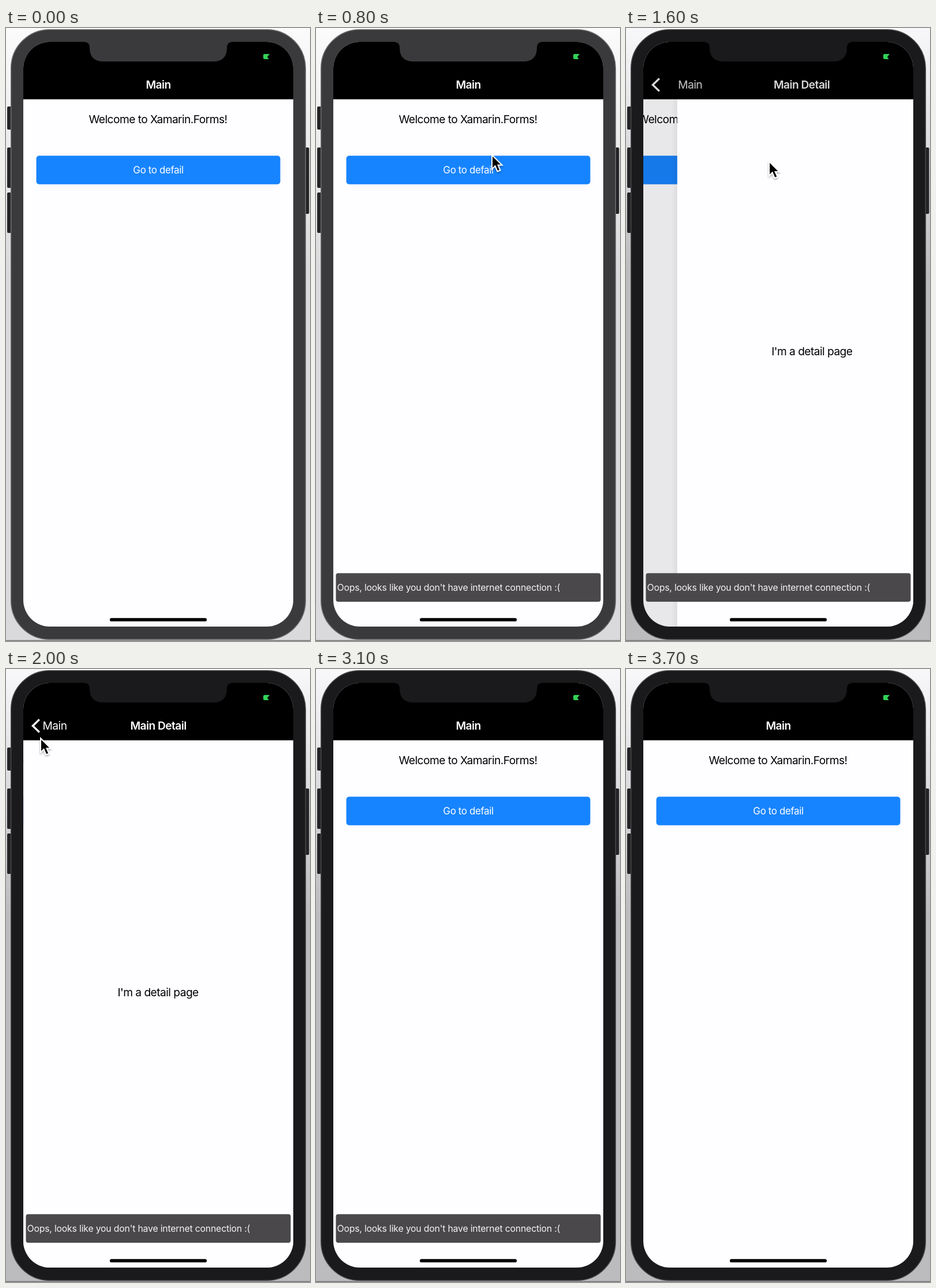
Recreate the animation shown at these times as an HTML page. Size 527 by 1062 pixels, loop 3.8 s.

```html
<!DOCTYPE html>
<html lang="en">
<head>
<meta charset="utf-8">
<title>Offline notice</title>
<style>
  html, body { margin: 0; width: 100%; height: 100%; overflow: hidden; background: #fff; }
  svg {
    display: block; width: 527px; height: 1062px;
    --case: #3a393b; --rim: #6e7072; --shade-top: #fbfbfc; --shade: #dadadc;
  }
  svg.active { --case: #1a191b; --rim: #47494b; --shade-top: #f8f8fa; --shade: #bcbcbe; }
  .case { fill: var(--case); }
  .rim { stroke: var(--rim); stroke-width: 1.5; }
  .key { fill: #242426; }
  text { font-family: Inter, "Open Sans", sans-serif; font-size: 19.2px; letter-spacing: -.029em; fill: #000; }
  .mid { text-anchor: middle; }
  .nav text { fill: #fff; }
  .title { font-weight: 600; }
  text.small { font-size: 17px; letter-spacing: -.024em; fill: #fff; }
  text.note { font-size: 15.8px; letter-spacing: -.012em; fill: #f4f3f4; }
</style>
</head>
<body>
<svg id="stage" viewBox="0 0 527 1062">
  <defs>
    <linearGradient id="backdrop" x2="0" y2="1">
      <stop offset="0" style="stop-color: var(--shade-top)"/>
      <stop offset=".4" style="stop-color: var(--shade)"/>
      <stop offset="1" style="stop-color: var(--shade)"/>
    </linearGradient>
    <linearGradient id="edge">
      <stop offset="0" stop-color="#000" stop-opacity="0"/>
      <stop offset="1" stop-color="#000" stop-opacity=".05"/>
    </linearGradient>
    <clipPath id="screen"><rect x="30" y="24" width="468" height="1013" rx="46"/></clipPath>
    <filter id="soft" x="-50%" y="-50%" width="200%" height="200%">
      <feDropShadow dx="0" dy="2" stdDeviation="1.5" flood-opacity=".35"/>
    </filter>
  </defs>

  <rect width="527" height="1062" fill="url(#backdrop)"/>
  <rect y="1060.5" width="527" height="1.5" fill="#777779"/>

  <g class="key">
    <rect x="2" y="136" width="10" height="40" rx="2"/>
    <rect x="2" y="207" width="10" height="70" rx="2"/>
    <rect x="2" y="285" width="10" height="70" rx="2"/>
    <rect x="515" y="207" width="10.5" height="115" rx="2"/>
  </g>
  <rect class="case rim" x="8.7" y="2.7" width="510.6" height="1056.6" rx="67"/>

  <g clip-path="url(#screen)">
    <rect x="30" y="24" width="468" height="1013" fill="#fefdff"/>
    <g id="mainPage">
      <text class="mid" x="263.5" y="165">Welcome to Xamarin.Forms!</text>
      <rect x="52.5" y="221.2" width="423" height="49.5" rx="5" fill="#1784ff"/>
      <text id="buttonText" class="small mid" x="264" y="252">Go to defail</text>
    </g>
    <rect id="dim" x="30" y="123.5" width="468" height="914"/>
    <g id="detailPage">
      <rect x="20" y="123.5" width="10" height="914" fill="url(#edge)"/>
      <rect x="30" y="123.5" width="468" height="914" fill="#fefdff"/>
      <text class="mid" x="263.5" y="567">I'm a detail page</text>
    </g>

    <g class="nav">
      <rect x="30" y="24" width="468" height="99.5"/>
      <text id="mainTitle" class="title mid" x="264" y="105">Main</text>
      <text id="detailTitle" class="title mid" x="264" y="105">Main Detail</text>
      <polyline id="chevron" points="57.8,87.5 46.4,98.5 57.8,109.5" fill="none" stroke="#fff" stroke-width="3.3"/>
      <text id="backText" x="63.5" y="105">Main</text>
    </g>
    <path class="case" d="M135 23V24Q145 24 145 34Q145 58 169 58H359Q383 58 383 34Q383 24 393 24V23Z"/>
    <path fill="#33d158" d="M446 47.5Q446 45 448.5 45H457L453 50L455.5 54H448.5Q446 54 446 51.5Z"/>

    <g id="snackbar">
      <rect x="34.5" y="944.5" width="459" height="49.5" rx="4" fill="#4a484b"/>
      <text class="note" x="36.5" y="975">Oops, looks like you don't have internet connection :(</text>
    </g>
    <rect x="180" y="1022.3" width="168" height="5.7" rx="2.8"/>
  </g>

  <g id="cursor">
    <path filter="url(#soft)" stroke="#fff" stroke-width="2" d="M1 2V26.5L6.5 21L10.5 30.5L15.5 28.5L11.5 19.5H18.5Z"/>
  </g>
</svg>
<script>
  const LOOP = 3800, TICK = 100;
  const PUSH = 1400, POP = 2336;
  const el = {};
  document.querySelectorAll('[id]').forEach(node => el[node.id] = node);

  const clamp = v => Math.min(1, Math.max(0, v));
  const lerp = (a, b, k) => a + (b - a) * k;
  const smooth = k => k * k * (3 - 2 * k);
  const ramp = (t, from, to) => clamp((t - from) / (to - from));

  // Critically damped spring, 0 to 1
  function spring(ms) {
    const x = Math.max(0, ms) * 0.018;
    return 1 - (1 + x) * Math.exp(-x);
  }

  // [time, x, y] of the pointer tip
  const path = [[700, 316, 204], [800, 304, 218], [1300, 282, 250], [1500, 282, 250], [1900, 59, 118], [2700, 59, 118]];

  function pointer(t) {
    const i = path.findIndex(p => p[0] > t);
    if (i < 1) return null;
    const [a, b] = [path[i - 1], path[i]];
    const k = smooth(ramp(t, a[0], b[0]));
    return [lerp(a[1], b[1], k), lerp(a[2], b[2], k)];
  }

  function place(node, x, y, opacity = 1) {
    node.setAttribute('transform', `translate(${x.toFixed(2)} ${y.toFixed(2)})`);
    node.setAttribute('opacity', opacity.toFixed(3));
  }

  function draw(t) {
    const popping = t >= 2300;
    const s = spring(t - (popping ? POP : PUSH));
    const depth = popping ? 1 - s : s;
    const lagged = s ** 1.2;
    const nav = popping ? 1 - lagged : lagged;

    el.stage.classList.toggle('active', t >= 1300);
    place(el.mainPage, -140 * depth, 0);
    el.dim.setAttribute('opacity', (0.1 * depth).toFixed(3));
    place(el.detailPage, 468 * (1 - depth), 0, depth > 0.001 ? 1 : 0);

    place(el.mainTitle, -179 * nav, 0, 1 - nav);
    place(el.detailTitle, 273 * (1 - nav), 0, nav);
    place(el.backText, 179 * (1 - nav), 0, clamp(2 * nav - 1) * (popping ? 0.3 : 1));
    el.chevron.setAttribute('opacity', popping ? Math.min(nav, 0.2) : nav);

    const pressed = t >= 1400 && t < 1700;
    el.buttonText.setAttribute('opacity', pressed ? lerp(0.2, 1, ramp(t, 1400, 1700)) : 1);
    el.snackbar.setAttribute('opacity', ramp(t, 650, 800) * (1 - ramp(t, 3200, 3500)));

    const tip = pointer(t);
    place(el.cursor, ...(tip || [0, 0]), tip ? 1 : 0);
  }

  function frame(now) {
    draw(Math.floor((now % LOOP) / TICK) * TICK);
    requestAnimationFrame(frame);
  }
  draw(0);
  requestAnimationFrame(frame);
</script>
</body>
</html>
```
